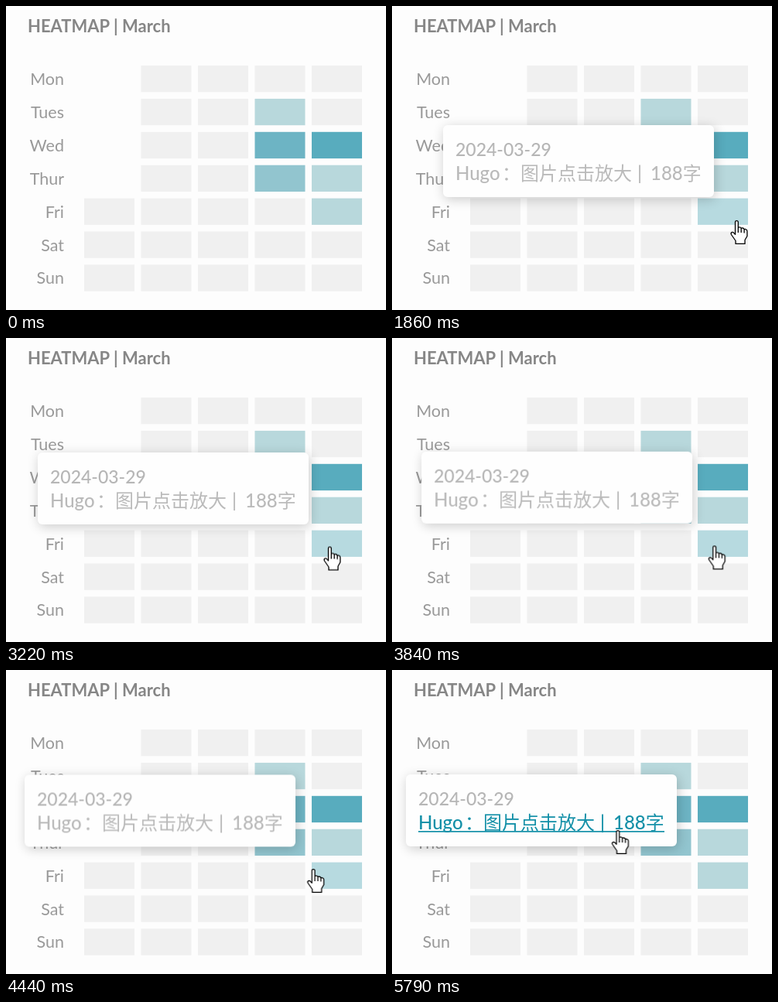
An HTML page for the animation above (8000 ms loop, 491 by 393 pixels).

```html
<!DOCTYPE html>
<html lang="zh-CN">
<head>
<meta charset="utf-8">
<title>Heatmap</title>
<style>
  html, body { margin: 0; width: 100%; height: 100%; overflow: hidden; background: #fdfdfd; }
  body { position: relative; }
  svg { display: block; overflow: visible; }
  text { font-family: Lato, "Noto Sans CJK SC", "Noto Sans CJK", sans-serif; }
  .title { font-size: 22px; font-weight: 700; fill: #868686; }
  .day { font-size: 21.5px; fill: #999; text-anchor: end; }
  #tip {
    position: absolute; left: 0; top: 0; width: 350px; height: 93px;
    background: #fefefe; border-radius: 6px;
    box-shadow: 1.5px 3px 15px rgba(0, 0, 0, .2); opacity: 0;
  }
  #tip text { font-size: 24px; font-weight: 500; fill: #bababa; }
  #tip .date { font-size: 23px; fill: #b6b6b6; }
  #link { color: #bababa; }
  #link text { fill: currentColor; }
  #rule { fill: #1490a8; opacity: 0; }
  #cursor { position: absolute; left: 0; top: 0; width: 1px; height: 1px; }
  #hand { fill: #fff; stroke: #000; stroke-width: 1.3; stroke-linejoin: round; opacity: 0; }
  #arrow { fill: #000; stroke: #fff; stroke-width: 1; }
</style>
</head>
<body>
<svg id="chart" width="491" height="393">
  <text class="title" x="28" y="34">HEATMAP | March</text>
</svg>

<div id="tip">
  <svg width="350" height="93">
    <text class="date" x="16" y="40">2024-03-29</text>
    <g id="link">
      <text y="71"><tspan x="16">Hugo</tspan><tspan x="76">：</tspan><tspan x="100">图片点击放大</tspan><tspan x="251">|</tspan><tspan x="268">188字</tspan></text>
    </g>
    <rect id="rule" x="16" y="73" width="318" height="1.7"/>
  </svg>
</div>

<svg id="cursor">
  <g id="hand">
    <path transform="translate(-7.5 0)" d="M6 2Q6 .6 7.9 .6Q9.8 .6 9.8 2.5V10Q10 8.8 11.6 8.8Q13.5 8.8 13.7 10.8Q14.2 9.8 15.6 10Q17.4 10.2 17.6 12Q18.3 11.3 19.4 11.6Q21.4 12 21.4 14V20.5L18.5 25.5V30.4H6.5V26.5L.9 18.5Q0 16.5 1.5 15.6Q3 15 4.4 16.6L6 18.3Z M9.8 9V16M13.7 10.5V16M17.6 12V16.5"/>
  </g>
  <path id="arrow" d="M.5 .5V25L6.2 19.6L10.4 29L14.4 27.2L10.3 18.2H18.3Z"/>
</svg>

<script>
const LOOP = 8000;
const $ = id => document.getElementById(id);
const chart = $("chart");

function add(tag, attrs, text = "") {
  const el = document.createElementNS("http://www.w3.org/2000/svg", tag);
  for (const k in attrs) el.setAttribute(k, attrs[k]);
  el.textContent = text;
  return chart.appendChild(el);
}

// Heatmap: shade by "row,column"
const shades = {
  "1,3": "#b8d8dc", "2,3": "#6db4c4", "2,4": "#58acbe",
  "3,3": "#92c5cf", "3,4": "#b8d8dc", "4,4": "#b8d8dc"
};
const cells = {};
["Mon", "Tues", "Wed", "Thur", "Fri", "Sat", "Sun"].forEach((day, row) => {
  const y = 77 + row * 42.9;
  add("text", { class: "day", x: 75, y: y + 25 }, day);
  for (let col = row < 4 ? 1 : 0; col < 5; col++) {
    const key = row + "," + col;
    cells[key] = add("rect", {
      x: 101 + col * 73.5, y, width: 65, height: 34.3, fill: shades[key] || "#f0f0f0"
    });
  }
});

function play(el, frames) {
  const anim = el.animate(frames, { duration: LOOP, iterations: Infinity });
  anim.startTime = 0;
  return anim;
}

// rows: [ms, x, y, easing]
function move(el, rows) {
  const all = [[0, ...rows[0].slice(1, 3)], ...rows, [LOOP, ...rows.at(-1).slice(1, 3)]];
  return play(el, all.map(([t, x, y, easing = "linear"]) =>
    ({ offset: t / LOOP, transform: `translate(${x}px, ${y}px)`, easing })));
}

// rows: [ms, value], each held until the next
function hold(el, prop, rows) {
  return play(el, [...rows, [LOOP, rows.at(-1)[1]]].map(([t, v]) =>
    ({ offset: t / LOOP, [prop]: v, easing: "steps(1, end)" })));
}

const anims = [
  move($("cursor"), [
    [499, 510, 301], [500, 487, 299, "ease-out"], [600, 472.5, 298],
    [790, 472.5, 298, "ease-in-out"], [1020, 462, 287],
    [1390, 462, 287, "ease-in-out"], [1800, 445, 277],
    [2810, 445, 277, "ease-in-out"], [3220, 418, 269.5], [3400, 417, 269],
    [3600, 417, 269], [3610, 417, 270], [3790, 417, 270],
    [4070, 413, 261], [4350, 403, 257], [4480, 394, 257], [4570, 385, 261],
    [4860, 377.5, 261.5], [5420, 308, 227, "ease-out"], [5790, 291.5, 207]
  ]),
  move($("tip"), [
    [1560, 75, 160, "ease-out"], [1860, 66, 154],
    [2830, 66, 154, "ease-in-out"], [3220, 41, 148], [3420, 39, 148],
    [3800, 39, 148], [4070, 33, 140], [4400, 25, 135.5],
    [4570, 21, 135, "ease-out"], [4720, 18, 135]
  ]),
  play($("tip"), [[0, 0], [1560, 0], [1760, 1], [LOOP, 1]].map(([t, opacity]) =>
    ({ offset: t / LOOP, opacity }))),
  hold(cells["4,4"], "fill", [[0, "#b8d8dc"], [1560, "#b7dae0"], [4490, "#b8d8dc"]]),
  hold($("hand"), "opacity", [[0, 0], [930, 1], [4490, 0], [5470, 1]]),
  hold($("arrow"), "opacity", [[0, 1], [930, 0], [4490, 1], [5470, 0]]),
  hold($("link"), "color", [[0, "#bababa"], [5470, "#1490a8"]]),
  hold($("rule"), "opacity", [[0, 0], [5470, 1]])
];

// Start every track at the same moment
const start = document.timeline.currentTime ?? 0;
anims.forEach(a => { a.startTime = start; });
</script>
</body>
</html>
```
